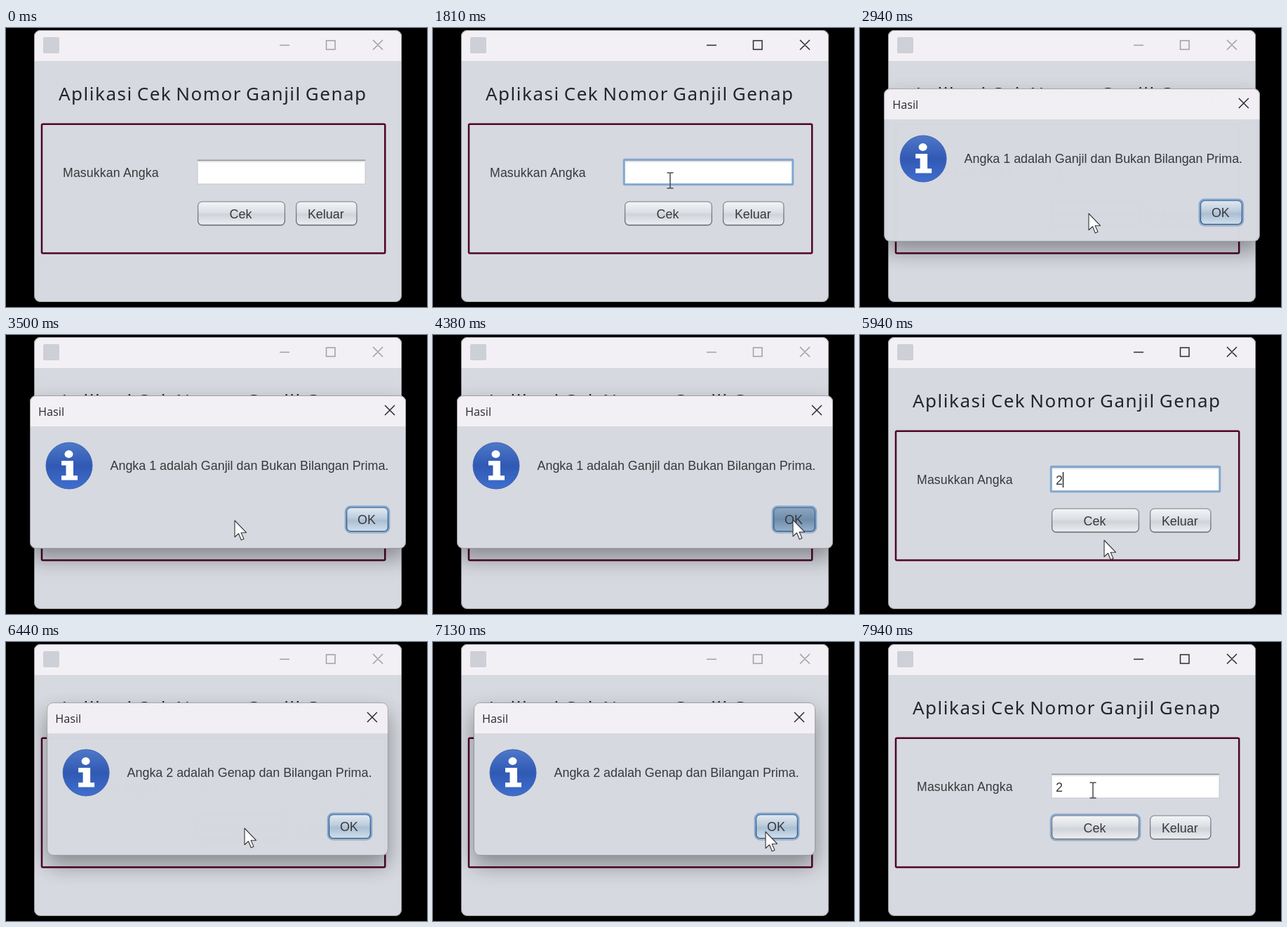
Recreate the animation shown at these times as an HTML page. Size 600 by 397 pixels, loop 8 s.

```html
<!DOCTYPE html>
<html lang="id">
<head>
<meta charset="utf-8">
<title>Aplikasi Cek Nomor Ganjil Genap</title>
<style>
  html, body { margin: 0; width: 100%; height: 100%; overflow: hidden; background: #000; }
  svg { display: block; width: 100%; height: 100%; }
  text { font: 17.9px "Liberation Sans", Arial, sans-serif; fill: #37383b; }
  .head { font: 26px "Noto Sans", "Open Sans", sans-serif; letter-spacing: 1.5px; word-spacing: -2.2px; fill: #242528; }
  .label { font-size: 17.7px; letter-spacing: .15px; }
  .bar { font: 16.3px "Open Sans", "Noto Sans", sans-serif; fill: #28282b; }
  .mid { text-anchor: middle; }
  .line { fill: none; stroke-width: 1.5; }
  .shade { filter: drop-shadow(0 14px 15px rgba(0, 0, 0, .37)); }
</style>
</head>
<body>
<svg id="stage" viewBox="0 0 600 397" preserveAspectRatio="none"></svg>
<script>
const LOOP = 8000;
const FIELD = { x: 273, y: 188, w: 239, h: 34 };
const CEK = { x: 273, y: 246.5, w: 125, h: 34.5 };
const KELUAR = { x: 413, y: 246.5, w: 87.5, h: 34.5 };

// time, x, y of the pointer's hot spot
const PATH = [
  [940, 412, 372], [1200, 343, 214], [1810, 338, 217], [2060, 338, 217],
  [2560, 326, 264], [3600, 326, 264], [4160, 513, 263], [4440, 513, 263],
  [4690, 402, 218], [4960, 318, 211], [5560, 318, 211], [5900, 348, 292],
  [5990, 348, 292], [6170, 340, 265], [6640, 340, 265], [7080, 474, 270],
  [7300, 474, 270], [7800, 332, 211], [8000, 332, 211]
];
const DIALOGS = [
  { open: 2810, close: 4440, x: 34, w: 536, text: 'Angka 1 adalah Ganjil dan Bukan Bilangan Prima.' },
  { open: 6310, close: 7250, x: 58, w: 487, text: 'Angka 2 adalah Genap dan Bilangan Prima.' }
];
const FOCUS = [[0, ''], [1310, 'field'], [2700, 'cek'], [5060, 'field'], [6230, 'cek']];
const TYPED = [[0, ''], [2000, '1'], [5310, ''], [5560, '2']];
const BLINKS = [1310, 2000, 5060, 5310, 5560];
const PRESSES = [[2700, 2800], [4350, 4440], [6230, 6310], [7180, 7250]];

const gradient = (id, ...stops) => `<linearGradient id="${id}" x2="0" y2="1">` +
  stops.map(([at, color]) => `<stop offset="${at}" stop-color="${color}"/>`).join('') + '</linearGradient>';

const rect = (x, y, w, h, rest) => `<rect x="${x}" y="${y}" width="${w}" height="${h}" ${rest}/>`;

const ring = ({ x, y, w, h }, r, id) =>
  rect(x - .8, y - .8, w + 1.6, h + 1.6, `id="${id}" rx="${r}" fill="none" stroke="#84a8cf" stroke-width="3"`);

const button = ({ x, y, w, h }, label, id, fill = 'face', edge = 'edge') =>
  rect(x + .5, y + 1.5, w - 1, h - .5, 'rx="6" fill="#b9bcc4"') +
  rect(x + .6, y + .6, w - 1.2, h - 1.2, `id="${id}" rx="6" fill="url(#${fill})" stroke="url(#${edge})" stroke-width="1.3"`) +
  `<text class="mid" x="${x + w / 2 - 1}" y="${y + 24}">${label}</text>`;

const frame = (x, y, w, h) => rect(x, y, w, h, 'rx="9" fill="#d6d9df"') +
  `<path d="M${x} ${y + 44}v-35a9 9 0 0 1 9-9h${w - 18}a9 9 0 0 1 9 9v35z" fill="#f3f0f5"/>` +
  rect(x + .5, y + .5, w - 1, h - 1, 'rx="8.5" fill="none" stroke="#75777c" stroke-opacity=".65"');

const cross = (x, y) => `M${x - 7} ${y - 7}l14 14m0-14l-14 14`;

function dialog({ x, w, text }, i) {
  const ok = { x: x + w - 85, y: 245, w: 60, h: 35 };
  const cx = x + 56;
  return `<g id="dialog${i}" class="shade">${frame(x, 86, w, 218)}
    <text class="bar" x="${x + 12}" y="115">Hasil</text>
    <path class="line" stroke="#2b2b2e" d="${cross(x + w - 23, 107)}"/>
    <circle cx="${cx}" cy="186" r="33" fill="url(#info)" stroke="#3c62b4" stroke-width="1"/>
    <ellipse cx="${cx - .5}" cy="169.5" rx="6" ry="5.4" fill="#fff"/>
    <path d="M${cx - 11} 179h17v21h6v6.5h-23v-6.5h6.5v-14.5h-6.5z" fill="#fff"/>
    <text x="${x + 114.5}" y="192">${text}</text>
    ${ring(ok, 7, 'okRing' + i)}${button(ok, 'OK', 'ok' + i, 'blue', 'blueEdge')}
  </g>`;
}

const stage = document.getElementById('stage');
stage.innerHTML = `<defs>
    ${gradient('face', [0, '#f4f5f7'], [.45, '#dcdfe4'], [.55, '#d0d3da'], [1, '#eceef1'])}
    ${gradient('hover', [0, '#fbfbfc'], [.45, '#e6e8ec'], [.55, '#dde0e5'], [1, '#f6f7f8'])}
    ${gradient('down', [0, '#a4adba'], [.5, '#8c97a8'], [1, '#b2bbc8'])}
    ${gradient('edge', [0, '#8f9299'], [1, '#62656c'])}
    ${gradient('blue', [0, '#e3eaf2'], [.45, '#bccbdc'], [.55, '#abbfd4'], [1, '#cfe0ee'])}
    ${gradient('blueDown', [0, '#8ea6c0'], [.5, '#6f8cab'], [1, '#97b1cb'])}
    ${gradient('blueEdge', [0, '#4f749e'], [1, '#2d5078'])}
    ${gradient('info', [0, '#4e78c8'], [.5, '#3059b4'], [1, '#3f6fce'])}
    ${gradient('inset', [0, '#c9cbcf'], [1, '#fff'])}
  </defs>
  <rect width="600" height="397"/>
  ${frame(40, 3, 524, 387)}
  ${rect(53, 13, 23, 23, 'rx="2" fill="#cdd0d6"')}
  <path id="controls" class="line" d="M390 24.5h14M456.5 18h12.5v12.5h-12.5z${cross(530, 24)}"/>
  <text class="head" x="75" y="103">Aplikasi Cek Nomor Ganjil Genap</text>
  ${rect(51, 136.8, 489.2, 183.6, 'rx="1.5" fill="none" stroke="#4e0529" stroke-width="2.5"')}
  <text class="label" x="81" y="212">Masukkan Angka</text>
  ${rect(FIELD.x, FIELD.y, FIELD.w, FIELD.h, 'fill="#fff" stroke="#c3c6cb"')}
  ${rect(FIELD.x, FIELD.y, FIELD.w, 4, 'fill="url(#inset)"')}
  <path d="M273 188.3h239" stroke="#96999f" stroke-width="1.4"/>
  ${ring(FIELD, 1, 'fieldRing')}
  <text id="value" x="279" y="212.5"></text>
  <path id="caret" d="M0 195v22" stroke="#222" stroke-width="1.4"/>
  ${ring(CEK, 7, 'cekRing')}${button(CEK, 'Cek', 'cek')}${button(KELUAR, 'Keluar', 'keluar')}
  ${DIALOGS.map(dialog).join('')}
  <path id="arrow" d="M0 0v23.5l5.5-5 3.8 9.2 3.7-1.6-3.9-8.9h7.4z" fill="#fff" stroke="#33343a" stroke-width="1.1" stroke-linejoin="round"/>
  <path id="beam" class="line" stroke="#4a4b4f" d="M-4.5-11h3.5l1 1 1-1h3.5M0-10v20M-4.5 11h3.5l1-1 1 1h3.5"/>`;

const el = {};
stage.querySelectorAll('[id]').forEach(node => el[node.id] = node);

const show = (node, on) => node.setAttribute('visibility', on ? 'visible' : 'hidden');
const clamp = v => Math.max(0, Math.min(1, v));
const latest = (list, t) => list.filter(([at]) => at <= t).pop()[1];
const inside = ({ x, y, w, h }, [px, py]) => px >= x && px <= x + w && py >= y && py <= y + h;

function pointer(t) {
  const i = PATH.findIndex(([at]) => at > t);
  if (i <= 0) return null;
  const [t0, x0, y0] = PATH[i - 1], [t1, x1, y1] = PATH[i];
  const p = (t - t0) / (t1 - t0), e = p * p * (3 - 2 * p);
  return [x0 + (x1 - x0) * e, y0 + (y1 - y0) * e];
}

function draw(t) {
  const pos = pointer(t);
  const modal = DIALOGS.some(d => t >= d.open && t < d.close);
  const focus = latest(FOCUS, t);
  const value = latest(TYPED, t);
  const pressed = PRESSES.some(([a, b]) => t >= a && t < b);

  el.controls.setAttribute('stroke', t >= 1310 && !modal ? '#2b2b2e' : '#a09fa4');
  show(el.fieldRing, focus === 'field');
  show(el.cekRing, focus === 'cek');
  el.value.textContent = value;

  const since = t - (BLINKS.filter(at => at <= t).pop() ?? t);
  show(el.caret, focus === 'field' && since % 1000 < 500);
  el.caret.setAttribute('transform', `translate(${value ? 289.5 : 279.5})`);

  const overCek = pos && !modal && inside(CEK, pos);
  const face = !overCek ? 'face' : pressed ? 'down' : 'hover';
  el.cek.setAttribute('fill', `url(#${face})`);

  DIALOGS.forEach((d, i) => {
    const node = el['dialog' + i];
    const into = 1 - (1 - clamp((t - d.open) / 160)) ** 3;
    const seen = into * (1 - clamp((t - d.close) / 120));
    const cx = d.x + d.w / 2, scale = .9 + .1 * seen;
    show(node, seen > 0);
    node.setAttribute('opacity', seen);
    node.setAttribute('transform', `translate(${cx} 195) scale(${scale}) translate(${-cx} -195)`);
    el['ok' + i].setAttribute('fill', `url(#${modal && pressed ? 'blueDown' : 'blue'})`);
  });

  const typing = pos && !modal && inside(FIELD, pos);
  show(el.arrow, pos && !typing);
  show(el.beam, typing);
  if (pos) (typing ? el.beam : el.arrow).setAttribute('transform', `translate(${pos})`);
}

const start = performance.now();
function tick() {
  draw((performance.now() - start) % LOOP);
  requestAnimationFrame(tick);
}
tick();
</script>
</body>
</html>
```
